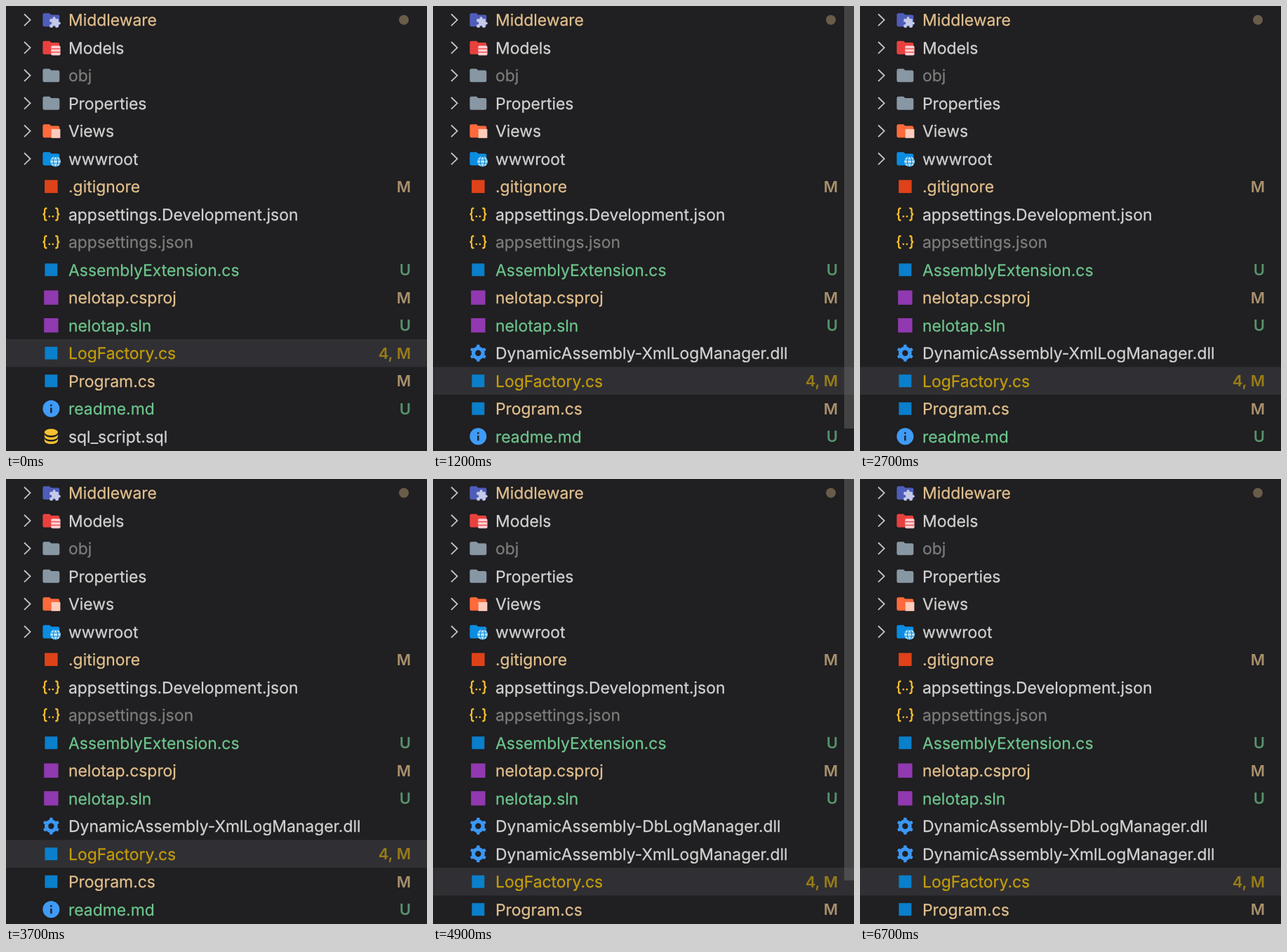
Animation, 600 px wide and 633 px high, one loop 6.8 s. Source, as an HTML page:

```html
<!DOCTYPE html>
<html lang="en">
<head>
<meta charset="utf-8">
<style>
  html, body { margin: 0; width: 100%; height: 100%; overflow: hidden; background: #201f21; }
  svg { display: block; width: 600px; height: 633px; }
  text { font: 22.9px Inter, Roboto, sans-serif; text-rendering: geometricPrecision; stroke-width: .25; }
  .status { font-size: 22px; font-weight: 600; text-anchor: end; }
</style>
</head>
<body>
<svg id="stage" viewBox="0 0 600 633">
  <rect width="600" height="633" fill="#201f21"/>
  <g id="rows"></g>
  <rect id="slider" x="586" width="14" fill="#797979"/>
</svg>
<script>
const LOOP = 6800;
const ROW = 39.5;
const FIRST_ADDED = 1200;
const SECOND_ADDED = 4900;

const COLORS = {
  plain: '#d2d2d2', modified: '#e2c08d', untracked: '#6dc58d',
  ignored: '#7d7d7d', warning: '#c39d0a'
};

// Icons live in a 24 x 24 box.
const folder = (color, badge = '') =>
  `<path fill="${color}" d="M10 4H4a2 2 0 0 0-2 2v12a2 2 0 0 0 2 2h16a2 2 0 0 0 2-2V8a2 2 0 0 0-2-2h-8z"/>${badge}`;
const square = (color, side = 17) =>
  `<rect x="${12 - side / 2}" y="${12 - side / 2}" width="${side}" height="${side}" fill="${color}"/>`;

const puzzle = `<path transform="translate(9 7.6) scale(.62)" fill="#c5cae9" d="M20.5 11H19V7a2 2 0 0 0-2-2h-4V3.5a2.5 2.5 0 0 0-5 0V5H4a2 2 0 0 0-2 2v3.8h1.5a2.7 2.7 0 0 1 0 5.4H2V20a2 2 0 0 0 2 2h3.8v-1.5a2.7 2.7 0 0 1 5.4 0V22H17a2 2 0 0 0 2-2v-4h1.5a2.5 2.5 0 0 0 0-5z"/>`;
const drawers = `<rect x="12" y="9.6" width="11" height="11.6" rx="1.4" fill="#ffcdd2"/>
  <path d="M12 13.4h11M12 17.4h11" stroke="#e5403c" stroke-width="1.1"/>`;
const globe = `<circle cx="17.2" cy="15.4" r="6.1" fill="#b3e5fc"/>
  <g fill="none" stroke="#0a88dc" stroke-width=".9"><ellipse cx="17.2" cy="15.4" rx="2.6" ry="6"/>
  <path d="M11.5 13.4h11.4M11.5 17.4h11.4"/></g>`;
const tooth = angle => `<path d="M9.9 5.5L10.3 2h3.4l.4 3.5z" transform="rotate(${angle} 12 12)"/>`;

const ICONS = {
  middleware: folder('#4f5dba', puzzle),
  models: folder('#e8413d', drawers),
  folder: folder('#8797a3'),
  views: folder('#ff6a3c', '<rect x="12.3" y="9.8" width="10.6" height="10.6" fill="#ffccbc"/>'),
  web: folder('#0a8ce0', globe),
  ignore: square('#de4219', 15.5),
  json: `<g fill="none" stroke="#f5bd2e" stroke-width="1.9">
    <path d="M7 4.9H6.2a1.9 1.9 0 0 0-1.9 1.9v3a2.2 2.2 0 0 1-2.2 2.2a2.2 2.2 0 0 1 2.2 2.2v3a1.9 1.9 0 0 0 1.9 1.9H7"/>
    <path d="M17 4.9h.8a1.9 1.9 0 0 1 1.9 1.9v3a2.2 2.2 0 0 0 2.2 2.2a2.2 2.2 0 0 0-2.2 2.2v3a1.9 1.9 0 0 1-1.9 1.9H17"/></g>
    <g fill="#f5bd2e"><circle cx="9.9" cy="14.6" r="1.1"/><circle cx="14.1" cy="14.6" r="1.1"/></g>`,
  code: square('#0a7fcb', 15),
  project: square('#9039b0'),
  gear: `<g fill="#3b97f3"><circle cx="12" cy="12" r="5.7" fill="none" stroke="#3b97f3" stroke-width="4.4"/>
    ${[0, 60, 120, 180, 240, 300].map(tooth).join('')}</g>`,
  info: `<circle cx="12" cy="12" r="10" fill="#3f9bf5"/>
    <path fill="#201f21" d="M11 7h2v2h-2zM11 11h2v6h-2z"/>`,
  database: `<g fill="#f8c032"><ellipse cx="12" cy="7" rx="8" ry="4"/>
    ${[9, 14].map(y => `<path d="M4 ${y}v3c0 2.21 3.58 4 8 4s8-1.79 8-4v-3c0 2.21-3.58 4-8 4s-8-1.79-8-4z"/>`).join('')}</g>`
};

const ENTRIES = [
  { name: 'Middleware', icon: 'middleware', kind: 'modified', dir: true, dot: true },
  { name: 'Models', icon: 'models', dir: true },
  { name: 'obj', icon: 'folder', kind: 'ignored', dir: true },
  { name: 'Properties', icon: 'folder', dir: true },
  { name: 'Views', icon: 'views', dir: true },
  { name: 'wwwroot', icon: 'web', dir: true },
  { name: '.gitignore', icon: 'ignore', kind: 'modified', status: 'M' },
  { name: 'appsettings.Development.json', icon: 'json' },
  { name: 'appsettings.json', icon: 'json', kind: 'ignored' },
  { name: 'AssemblyExtension.cs', icon: 'code', kind: 'untracked', status: 'U' },
  { name: 'nelotap.csproj', icon: 'project', kind: 'modified', status: 'M' },
  { name: 'nelotap.sln', icon: 'project', kind: 'untracked', status: 'U' },
  { name: 'DynamicAssembly-DbLogManager.dll', icon: 'gear', addedAt: SECOND_ADDED },
  { name: 'DynamicAssembly-XmlLogManager.dll', icon: 'gear', addedAt: FIRST_ADDED },
  { name: 'LogFactory.cs', icon: 'code', kind: 'warning', status: '4, M', selected: true },
  { name: 'Program.cs', icon: 'code', kind: 'modified', status: 'M' },
  { name: 'readme.md', icon: 'info', kind: 'untracked', status: 'U' },
  { name: 'sql_script.sql', icon: 'database' }
];

function rowMarkup({ name, icon, kind = 'plain', dir, dot, status, selected }) {
  const color = COLORS[kind];
  return `<g>
    ${selected ? `<rect width="600" height="${ROW}" fill="#302f33"/>` : ''}
    ${dir ? '<path d="M26 11.5l8.6 8.3-8.6 8.3" fill="none" stroke="#c4c4c4" stroke-width="1.8"/>' : ''}
    <g transform="translate(50 5.4) scale(1.196)">${ICONS[icon]}</g>
    <text x="89" y="28" fill="${color}" stroke="${color}">${name}</text>
    ${dot ? `<circle cx="567" cy="19.7" r="7" fill="${color}" opacity=".38"/>` : ''}
    ${status ? `<text class="status" x="577" y="27.8" fill="${color}" opacity=".7">${status}</text>` : ''}
  </g>`;
}

const rows = document.getElementById('rows');
const slider = document.getElementById('slider');
rows.innerHTML = ENTRIES.map(rowMarkup).join('');

// Opacity of the scrollbar: shown at once, then faded out.
function flash(time, shownAt, fadeAt, fadeMs = 800) {
  if (time < shownAt) return 0;
  return Math.min(1, Math.max(0, 1 - (time - fadeAt) / fadeMs));
}

function render(time) {
  let line = 0;
  ENTRIES.forEach(({ addedAt = 0 }, i) => {
    const row = rows.children[i];
    const visible = time >= addedAt;
    row.setAttribute('display', visible ? 'inline' : 'none');
    if (visible) row.setAttribute('transform', `translate(0 ${ROW * line++})`);
  });
  const second = time >= SECOND_ADDED;
  const shown = second ? flash(time, SECOND_ADDED, 5200) : flash(time, FIRST_ADDED, 1300);
  slider.setAttribute('height', second ? 571 : 601);
  slider.setAttribute('opacity', 0.4 * shown);
}

const start = performance.now();
function tick() {
  render((performance.now() - start) % LOOP);
  requestAnimationFrame(tick);
}
render(0);
requestAnimationFrame(tick);
</script>
</body>
</html>
```
